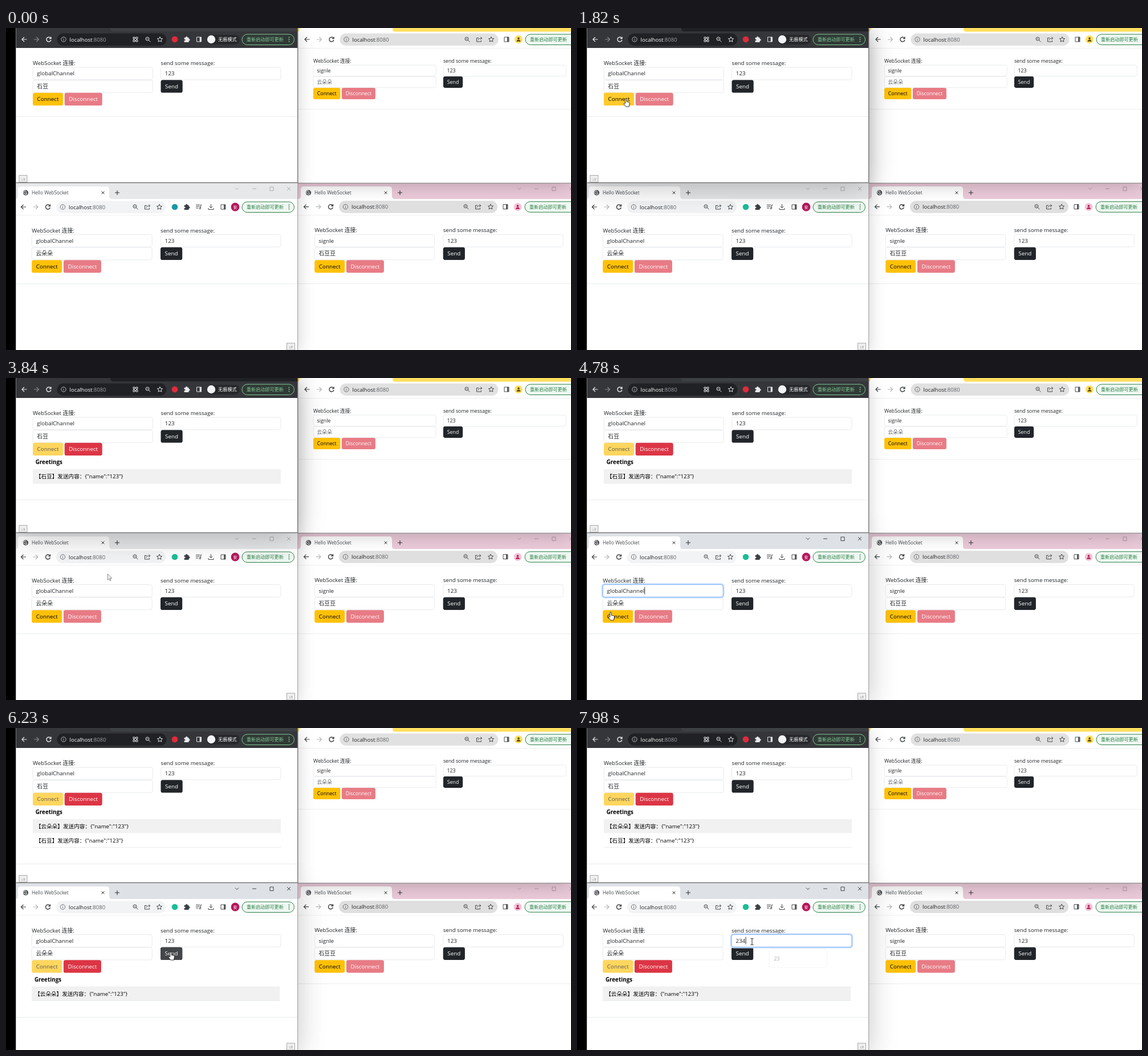
Write an HTML page that moves like this. It is 991x565 px and loops after 8000 ms.

```html
<!DOCTYPE html>
<html lang="zh-CN">
<head>
<meta charset="utf-8">
<style>
html, body { margin: 0; width: 100%; height: 100%; overflow: hidden; background: #fff }
body > svg { display: block; font-family: "Open Sans", "Noto Sans CJK SC", "Noto Sans CJK", sans-serif }
.active { filter: drop-shadow(0 8px 25px rgba(0, 0, 0, .24)) }
.idle { filter: drop-shadow(0 5px 15px rgba(0, 0, 0, .2)) }
text { white-space: pre }
</style>
</head>
<body>
<script>
const END = 8000;
const TOP_FOCUS = 1300, BOTTOM_FOCUS = 4450;
const FIRST_MESSAGE = 3430, SECOND_MESSAGE = 5900;

// Drawing helpers
const rect = (x, y, w, h, fill, r = 0, extra = '') =>
  `<rect x="${x}" y="${y}" width="${w}" height="${h}" rx="${r}" fill="${fill}" ${extra}/>`;
const circle = (x, y, r, fill) => `<circle cx="${x}" cy="${y}" r="${r}" fill="${fill}"/>`;
const text = (x, y, value, size = 9.85, fill = '#212529', extra = '') =>
  `<text x="${x}" y="${y}" font-size="${size}" fill="${fill}" ${extra}>${value}</text>`;
const path = (d, stroke, width = 1, fill = 'none') =>
  `<path d="${d}" stroke="${stroke}" stroke-width="${width}" fill="${fill}"/>`;
const at = (x, y, body, scale = 1, weight = 400) =>
  `<g transform="translate(${x} ${y}) scale(${scale})" font-weight="${weight}">${body}</g>`;
const faded = body => `<g opacity=".65">${body}</g>`;
const during = (from, to, body) => `<g data-from="${from}" data-to="${to}">${body}</g>`;
const shadow = (x, y, w, h, kind) => rect(x, y, w, h, '#fff', 0, `class="${kind}"`);
const pane = (x, y, w, h, body) =>
  `<svg x="${x}" y="${y}" width="${w}" height="${h}" viewBox="${x} ${y} ${w} ${h}">${rect(x, y, w, h, '#fff')}${body}</svg>`;

const ICONS = {
  back: 'M4.5 0H-4M0-4L-4 0 0 4',
  forward: 'M-4.5 0H4M0-4L4 0 0 4',
  reload: 'M3.2-2.4A4 4 0 1 0 3.9 1M4-4.6V-1.4H.8',
  info: 'M-4.2 0A4.2 4.2 0 1 1 4.2 0A4.2 4.2 0 1 1-4.2 0M0-.6V2.3M0-2.4V-1.4',
  zoom: 'M-4-1A3 3 0 1 1 2-1A3 3 0 1 1-4-1M1.2 1.2L4.4 4.4M-2.4-1H.4',
  star: 'M0-4.6L1.3-1.6 4.6-1.3 2.1.9 2.9 4.2 0 2.5-2.9 4.2-2.1.9-4.6-1.3-1.3-1.6Z',
  share: 'M-1-2.5H-4.5V4H3.5V1.8M-2 1.5C-1.5-1 0-2 4.5-2M2.4-4.4L4.8-2 2.4.4',
  grid: 'M-4-4H-1V-1H-4ZM1-4H4V-1H1ZM-4 1H-1V4H-4ZM1 1H4V4H1ZM-1-2.5H1M-1 2.5H1M-2.5-1V1M2.5-1V1',
  list: 'M-5-3.5H2M-5-.8H2M-5 2H-1M3.5 2.4V-3.5H5.5M3.5 2.4A1.3 1.3 0 1 1 .9 2.4A1.3 1.3 0 1 1 3.5 2.4',
  download: 'M0-5V1.5M-3-1.2L0 1.8 3-1.2M-4.5 2V4.5H4.5V2',
  panel: 'M-4-4H4V4H-4ZM2.3-4V4M1.6-4V4M3-4V4',
  puzzle: 'M-4-2.7H-1.5A1.4 1.4 0 1 1 1-2.7H3.2V-.4A1.4 1.4 0 1 1 3.2 2.1V4.5H-4V2.1A1.4 1.4 0 1 0-4-.4Z',
  close: 'M-2.4-2.4L2.4 2.4M-2.4 2.4L2.4-2.4',
  plus: 'M-4 0H4M0-4V4',
  globe: 'M-3-2L-.5-3.5 1-2 0 0 2 1 1 3.5-1 2-3.5 1Z',
  person: 'M0-3.4A1.7 1.7 0 1 1 0 0A1.7 1.7 0 1 1 0-3.4ZM-3.4 3.6Q-3 .8 0 .8T3.4 3.6Z',
};
const icon = (name, x, y, color, width = 1.2) =>
  at(x, y, path(ICONS[name], color, width, name === 'puzzle' || name === 'person' ? color : 'none'));

// Browser chrome
function toolbar({ x, y, dark, pill, pillWidth, icons, update }) {
  const ink = dark ? '#e8eaed' : '#3c4043';
  const muted = dark ? '#85878a' : '#b4b6b9';
  const green = dark ? '#81c995' : '#2a7f46';
  return icon('back', x, y, ink) + icon('forward', x + 21.5, y, muted) + icon('reload', x + 43, y, ink, 1.4) +
    rect(x + 57.5, y - 10.5, pillWidth, 21.5, pill, 10.7) +
    icon('info', x + 69, y, dark ? '#c4c6c9' : '#5f6368', .9) +
    text(x + 79.5, y + 3.5, `localhost<tspan fill="${dark ? '#9aa0a6' : '#5f6368'}">:8080</tspan>`, 9.5, dark ? '#fff' : '#202124') +
    icons.map(([name, cx]) => icon(name, cx, y, ink, .95)).join('') +
    rect(update, y - 9, 91.5, 18.5, dark ? '#303a36' : '#eff8f2', 9.2, `stroke="${green}"`) +
    text(update + 8, y + 3, '重新启动即可更新', 8.1, green) +
    [-3.5, 0, 3.5].map(d => circle(update + 82.5, y + d, 1, green)).join('');
}

const caption = (x, color) => path(
  `M${x} 280.5L${x + 3} 283.5 ${x + 6} 280.5M${x + 30} 282H${x + 37}M${x + 61} 279H${x + 67}V285.5H${x + 61}ZM${x + 91} 279L${x + 97} 285M${x + 91} 285L${x + 97} 279`, color, .9);

const tab = x => path(`M${x - 5} 300Q${x} 300 ${x} 295V283Q${x} 278 ${x + 5} 278H${x + 155}Q${x + 160} 278 ${x + 160} 283V295Q${x + 160} 300 ${x + 165} 300Z`, 'none', 0, '#fff') +
  circle(x + 13.5, 289, 4.7, '#4d5156') + icon('globe', x + 13.5, 289, '#fff', .9) +
  text(x + 24, 292, 'Hello WebSocket', 8.3, '#45494d') +
  icon('close', x + 149, 289, '#333', 1) + icon('plus', x + 174, 289, '#333', 1.1);

const status = (x, y) => rect(x, y, 14, 12, '#eee', 0, 'stroke="#aaa"') + text(x + 4, y + 9, '::1', 6, '#444');

// Page content, measured from the first input's corner
const input = (x, y, w, value, color) =>
  rect(x, y, w, 21.8, '#fff', 3.5, 'stroke="#e1e5e9" stroke-width=".8"') + text(x + 7.3, y + 14.4, value, 9.85, color);
const button = (x, y, w, label, fill, color) =>
  rect(x, y, w, 22.3, fill, 3.4) + text(x + w / 2, y + 14.6, label, 9.85, color, 'text-anchor="middle"');
const focusRing = (x, w) =>
  rect(x - 1, -1, w + 2, 23.8, 'none', 4.5, 'stroke="#c2dbfe" stroke-width="2.4"') +
  rect(x, 0, w, 21.8, 'none', 3.5, 'stroke="#86b7fe"');
const rule = (y, x = -40, w = 640) => rect(x, y, w, .8, '#e4e6e8');
const connectButton = fill => button(0, 44.8, 53, 'Connect', fill, '#000');
const disconnectButton = () => button(55.7, 44.8, 66, 'Disconnect', '#dc3545', '#fff');

function page({ x, y, scale, weight, second, width = 210.5, channel, name, nameColor, value = '123', hover = END,
                connect = END, send = [END, END], messages = [], extra = '' }) {
  const stages = [connect, ...messages.map(m => m.time), END];
  const sendButton = fill => button(second, 22.3, 38.2, 'Send', fill, '#fff');
  let body = text(0, -4, 'WebSocket 连接:', 9.75) + text(second, -4, 'send some message:', 9.75) +
    input(0, 0, width, channel) + input(0, 22.5, width, name, nameColor) + input(second, 0, width, value) +
    sendButton('#212529') + during(...send, sendButton('#424649')) +
    during(0, connect, connectButton('#ffc107') + faded(disconnectButton()) + rule(86)) +
    during(hover, connect, connectButton('#ffca2c')) +
    during(connect, END, faded(connectButton('#ffc107')) + disconnectButton() +
      text(4.7, 82, 'Greetings', 9.85, '#000', 'font-weight="700"'));
  for (let count = 0; count <= messages.length; count++) {
    const rows = messages.slice(0, count).reverse().map((m, i) =>
      rect(0, 91 + i * 24.5, 435, 24.5, i % 2 ? '#fff' : '#f1f1f1') +
      text(5, 107 + i * 24.5, `【${m.from}】发送内容：{"name":"123"}`, 9.6, '#000')).join('');
    const bottom = 91 + count * 24.5;
    body += during(stages[count], stages[count + 1],
      rows + rule(bottom, 0, 435) + rule(bottom + 29));
  }
  return at(x, y, body + extra, scale, weight);
}

// The four windows
const bottomRight = pane(512, 272, 479, 293,
  rect(512, 272, 479, 28, '#ebcad9') + tab(517) + caption(897, '#a8929c') +
  toolbar({ x: 526.5, y: 313.7, pill: '#dfdfdf', pillWidth: 278, update: 910,
    icons: [['zoom', 807], ['share', 828], ['star', 850], ['panel', 876]] }) +
  circle(897.5, 314, 7, '#f3c6d9') + icon('person', 897.5, 314, '#b3194f', .3) +
  rect(512, 328, 479, .8, '#eee') +
  page({ x: 541.2, y: 362.4, second: 225.5, channel: 'signle', name: '石豆豆' }));

const topRight = pane(512, 0, 479, 272,
  rect(512, 0, 6, 6, '#ffdf5e') + rect(514, 0, 165, 12, '#fff', 5) +
  path('M678 0H991V6.5H683Q678 6.5 678 1Z', 'none', 0, '#ffdf5e') +
  toolbar({ x: 528, y: 20, pill: '#e1e1e1', pillWidth: 278, update: 911,
    icons: [['zoom', 809], ['share', 830], ['star', 851], ['panel', 878]] }) +
  circle(899, 20, 7, '#ffdf5e') + icon('person', 899, 20, '#54430a', .3) +
  rect(512, 35, 479, .8, '#e8e8e8') +
  page({ x: 539, y: 65, scale: .895, weight: 500, second: 254.7, width: 240.5, channel: 'signle',
    name: '云朵朵', nameColor: '#5f656b' }));

const digits = (value, fill) => text(233.3, 14.4, value, 9.85, fill);
const caret = x => rect(x, 4, .8, 13, '#000');
const typed = (from, to, value) =>
  during(from, to, digits(value) + caret(233.6 + value.length * 5.63));
const suggestion = opacity => `<g opacity="${opacity}">` +
  rect(292, 25.5, 101, 32, '#fff', 3, 'stroke="#ddd" stroke-width=".8"') + text(300, 45.5, '23', 9, '#333') + '</g>';

const bottomLeft = pane(17, 272, 494.5, 293,
  rect(17, 272, 495, 28, '#e7e8ea') + during(BOTTOM_FOCUS, END, rect(17, 272, 495, 28, '#dee1e6')) +
  tab(21) + during(0, BOTTOM_FOCUS, caption(402, '#aaa')) + during(BOTTOM_FOCUS, END, caption(402, '#333')) +
  toolbar({ x: 30.5, y: 314, pill: '#f1f3f4', pillWidth: 192, update: 414,
    icons: [['zoom', 227], ['share', 248], ['star', 269], ['puzzle', 317], ['list', 338], ['download', 359.5], ['panel', 381]] }) +
  during(0, TOP_FOCUS, circle(296, 314, 5.3, '#1798a5')) + during(TOP_FOCUS, END, circle(296, 314, 5.3, '#19bd97')) +
  circle(402, 314, 7.4, '#b5175c') + text(402, 316.5, '安', 7, '#fff', 'text-anchor="middle"') +
  rect(17, 328, 495, .8, '#eee') +
  page({
    x: 45.2, y: 362.5, second: 225.8, width: 211, channel: 'globalChannel', name: '云朵朵', value: '',
    hover: 4850, connect: 5060, send: [5680, 6320],
    messages: [{ time: SECOND_MESSAGE, from: '云朵朵' }],
    extra: during(BOTTOM_FOCUS, 5000, focusRing(0, 211) + caret(73.2)) +
      during(6500, END, focusRing(225.8, 211)) +
      during(0, 6700, digits('123')) +
      during(6700, 7850, rect(233.2, 3.5, 17.2, 14.5, '#3367d1') + digits('123', '#fff')) +
      typed(7850, 7915, '2') + typed(7915, 7975, '23') + typed(7975, END, '234') +
      during(7915, 7975, suggestion(.9)) + during(7975, END, suggestion(.4)),
  }) + status(492.5, 553));

const darkStrip = fill => path('M183 0H512V6H188Q183 6 183 1Z', 'none', 0, fill);
const topLeft = pane(17, 0, 494.5, 271,
  rect(17, 0, 495, 35, '#35363a') + darkStrip('#3c4043') +
  during(TOP_FOCUS, BOTTOM_FOCUS, darkStrip('#202124')) +
  toolbar({ x: 32, y: 20, dark: true, pill: '#202124', pillWidth: 192, update: 414,
    icons: [['grid', 227], ['zoom', 249], ['star', 270], ['puzzle', 317], ['panel', 338.5]] }) +
  circle(296, 20, 5.4, '#e02b3c') +
  rect(352, 12, 58, 17, '#27282b', 8.5) + circle(360, 20, 7.2, '#f1f3f4') +
  text(372, 23.2, '无痕模式', 8.2, '#fff') +
  page({
    x: 47, y: 69, second: 224.5, channel: 'globalChannel', name: '石豆',
    hover: 1680, connect: 2170, send: [3130, 3580],
    messages: [{ time: FIRST_MESSAGE, from: '石豆' }, { time: SECOND_MESSAGE, from: '云朵朵' }],
  }) + status(23, 258.5));

const cursors = {
  arrow: path('M0 0V10.5L2.5 8.2 4.2 12 5.9 11.2 4.2 7.6H7.5Z', '#666', .8, '#f6f6f6'),
  hand: path('M-1.2 8V1A1.2 1.2 0 0 1 1.2 1V5.2L5.5 6.2Q6.8 6.6 6.6 8L5.7 12V14H-.3L-3.7 9.2Q-3.5 6.8-1.2 8.5Z', '#222', .9, '#fff'),
  beam: path('M-2.5-5.5H-.7L0-5 .7-5.5H2.5M0-5V5M-2.5 5.5H-.7L0 5 .7 5.5H2.5', '#222', 1),
};

document.body.innerHTML = `<svg width="991" height="565" viewBox="0 0 991 565">` +
  bottomRight + shadow(512, 0, 479, 272, 'idle') + topRight + rect(512, 271.6, 479, 1.2, '#8c8c8c') +
  shadow(17, 0, 494, 271, 'idle') +
  during(0, BOTTOM_FOCUS, shadow(17, 273, 494, 292, 'idle')) +
  during(BOTTOM_FOCUS, END, shadow(17, 273, 494, 292, 'active')) + bottomLeft +
  during(TOP_FOCUS, BOTTOM_FOCUS, shadow(17, 0, 494, 271, 'active')) + topLeft +
  rect(17, 270.7, 495, 1.5, '#777') + rect(511.2, 0, 1.2, 272, '#666') + rect(511.2, 272, 1, 293, '#999') +
  rect(0, 0, 17, 565, '#000') + rect(17, 0, .7, 565, '#999') +
  Object.entries(cursors).map(([kind, body]) => `<g id="${kind}">${body}</g>`).join('') + '</svg>';

// Pointer track: time, x, y, shape from that time on
const track = [
  [240, 942, 556, 'arrow'], [560, 610, 335, 'arrow'], [990, 202, 123, 'arrow'], [1060, 195, 123, 'arrow'],
  [1640, 98, 124, 'hand'], [1820, 86, 124, 'hand'], [1960, 65, 123, 'hand'], [2170, 65, 123, 'arrow'],
  [2450, 90, 124, 'arrow'], [2890, 338, 106, 'arrow'], [2960, 336, 106, 'arrow'], [3130, 300, 101, 'hand'],
  [3200, 292, 100, 'hand'], [3500, 292, 100, 'hand'], [3580, 305, 114, 'arrow'], [3710, 325, 165, 'arrow'],
  [3840, 178.5, 343.5, 'arrow'], [3960, 146, 382, 'beam'], [4250, 126, 378, 'beam'], [4560, 126, 378, 'beam'],
  [4680, 85, 402, 'hand'], [4780, 59, 411, 'hand'], [5060, 59, 411, 'hand'], [5180, 85, 420, 'arrow'],
  [5370, 180, 426, 'arrow'], [5560, 263.5, 408.5, 'arrow'], [5680, 288, 397, 'hand'],
  [6250, 289, 393, 'hand'], [6380, 298, 383, 'beam'], [6500, 306, 371, 'beam'], [6840, 307, 369, 'beam'],
  [7850, 307, 369, 'beam'], [7920, 307, 375, 'beam'],
];
const pointers = Object.keys(cursors).map(id => document.getElementById(id));
const timed = [...document.querySelectorAll('[data-from]')].map(node =>
  ({ node, from: +node.dataset.from, to: +node.dataset.to }));

function movePointer(time) {
  const index = track.findLastIndex(key => key[0] <= time);
  const [t0, x0, y0, shape] = track[index] || [0, 0, 0, ''];
  const [t1, x1, y1] = track[index + 1] || [END, x0, y0];
  const p = (time - t0) / (t1 - t0);
  for (const node of pointers) {
    node.style.display = node.id === shape ? '' : 'none';
    node.setAttribute('transform', `translate(${x0 + (x1 - x0) * p} ${y0 + (y1 - y0) * p})`);
  }
}

function draw(now) {
  const time = now % END;
  for (const { node, from, to } of timed) node.style.display = time >= from && time < to ? '' : 'none';
  movePointer(time);
  requestAnimationFrame(draw);
}
draw(performance.now());
</script>
</body>
</html>
```
